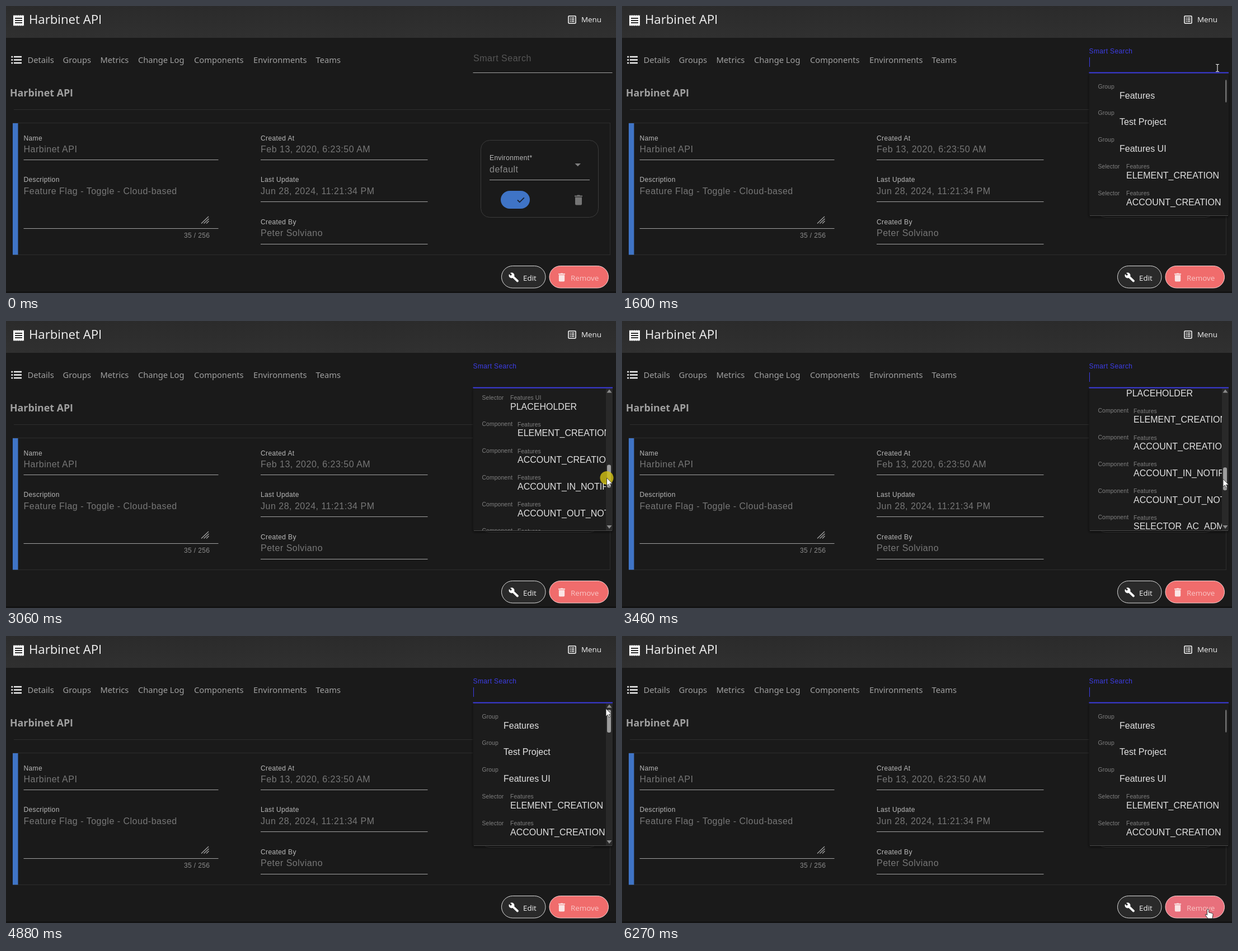
Write an HTML page that moves like this. It is 1090 by 514 pixels and loops after 6650 ms.

```html
<!DOCTYPE html>
<html lang="en">
<head>
<meta charset="utf-8">
<title>Smart search</title>
<style>
  html, body { margin: 0; width: 100%; height: 100%; overflow: hidden; background: #1a1a1a; }
  svg { display: block; width: 100vw; height: 100vh; }
  text { font-family: "Liberation Sans", Arial, sans-serif; white-space: pre; }
  .title, .heading, .button { font-family: "Open Sans", sans-serif; }
  .title { font-size: 22.2px; fill: #f2f2f2; }
  .heading { font-size: 17.8px; font-weight: 700; fill: #a0a0a0; }
  .button { font-size: 13.4px; fill: #f4f4f4; }
  .nav { font-family: "Noto Sans", sans-serif; font-size: 14.7px; fill: #a0a0a0; }
  .label { font-size: 12px; letter-spacing: .38px; fill: #b9b9b9; }
  .value { font-size: 16px; letter-spacing: .5px; fill: #777; }
  .small { font-size: 10.4px; letter-spacing: .1px; fill: #808080; }
  .option { font-size: 16px; fill: #e2e2e2; }
  .rule { stroke: #a2a2a2; fill: none; }
  .faint { stroke: #2d2d2d; fill: none; }
</style>
</head>
<body>
<svg viewBox="0 0 1090 514">
  <defs>
    <clipPath id="listClip"><rect x="834" y="121" width="238" height="254"/></clipPath>
    <linearGradient id="headerFill" x2="0" y2="1">
      <stop offset="0" stop-color="#2b2b2b"/><stop offset="1" stop-color="#303030"/>
    </linearGradient>
    <filter id="shadow" x="-10%" y="-10%" width="120%" height="120%">
      <feDropShadow dx="0" dy="2" stdDeviation="2" flood-color="#000" flood-opacity=".6"/>
    </filter>
    <path id="trash" d="M1 4h12v12q0 2-2 2H3q-2 0-2-2zM0 1h4l1-1h4l1 1h4v2H0z"/>
  </defs>

  <rect width="1090" height="514" fill="#1a1a1a"/>
  <rect y="511" width="1090" height="3" fill="#131313"/>
  <rect width="1090" height="57" fill="url(#headerFill)"/>

  <!-- header -->
  <path fill="#fff" d="M13 16l1.6 1.5 1.6-1.5 1.6 1.5 1.6-1.5 1.6 1.5 1.6-1.5 1.6 1.5 1.6-1.5 1.6 1.5 1.6-1.5 1.6 1.5L32 16v20l-1.4-1.5-1.6 1.5-1.6-1.5-1.6 1.5-1.6-1.5-1.6 1.5-1.6-1.5-1.6 1.5-1.6-1.5-1.6 1.5-1.6-1.5L13 36z"/>
  <path stroke="#2d2d2d" stroke-width="2" d="M16 22h13M16 26h13M16 30h13"/>
  <text class="title" x="41" y="32">Harbinet API</text>
  <rect x="1005" y="18" width="13" height="13" rx="1" fill="none" stroke="#fff" stroke-width="1.5"/>
  <path stroke="#fff" stroke-width="1.4" d="M1007.5 21.5h2m1 0h5M1007.5 24.5h2m1 0h5M1007.5 27.5h2m1 0h5"/>
  <text class="button" x="1028" y="29.3" font-weight="500">Menu</text>

  <!-- navigation -->
  <path stroke="#f0f0f0" stroke-width="2.4" d="M14 91h14M14 96.5h14M14 102h14"/>
  <path stroke="#f0f0f0" stroke-width="3.2" stroke-linecap="round" d="M10.8 91h.01M10.8 96.5h.01M10.8 102h.01"/>
  <g id="nav"></g>
  <text class="heading" x="7" y="162">Harbinet API</text>
  <path class="faint" d="M14 185.5H1080"/>

  <!-- details card -->
  <rect class="faint" x="12.5" y="209.5" width="1067" height="236"/>
  <rect x="12" y="210" width="9.5" height="235.5" fill="#3f74c6"/>
  <g id="fields"></g>
  <path class="rule" d="M31.5 275.5H379.5M31.5 398.5H379.5M455 275.5H753.5M455 350.5H753.5M455 426.5H753.5"/>
  <path stroke="#a0a0a0" stroke-width="1.3" d="M349 389.5l13-12.5M353.5 389.5l9-8.5M358 389.5l4.5-4.5"/>
  <text class="label" x="364.4" y="414.5" text-anchor="end" style="fill:#8c8c8c">35 / 256</text>

  <!-- environment -->
  <rect x="848.5" y="240.5" width="210" height="138" rx="16" fill="#1a1a1a" stroke="#3b3b3b"/>
  <text class="label" x="864" y="276">Environment*</text>
  <text class="value" x="864" y="297.5" style="fill:#8a8a8a">default</text>
  <path class="rule" d="M864 311.5H1043"/>
  <path fill="#808080" d="M1016.5 282h10.5l-5.25 5.25z"/>
  <rect x="884" y="331" width="52" height="32" rx="16" fill="#3f74c6"/>
  <path fill="none" stroke="#17202e" stroke-width="1.8" d="M914 347.5l3.8 3.8 8-8"/>
  <use href="#trash" x="1016" y="338.5" fill="#757575"/>

  <!-- actions -->
  <rect x="885.5" y="465.5" width="78.5" height="39.5" rx="19.75" fill="#2a2a2a" stroke="#dedede"/>
  <g transform="translate(898 477)">
    <path stroke="#fff" stroke-width="3.8" stroke-linecap="round" d="M6 6l10 9.5"/>
    <circle cx="5.5" cy="5.5" r="5" fill="#fff"/>
    <path stroke="#2a2a2a" stroke-width="3" d="M0 0l5 5"/>
  </g>
  <text class="button" x="924" y="491.5">Edit</text>
  <rect id="remove" x="971" y="465.5" width="105.5" height="39.5" rx="19.75" stroke="#f6d4d4"/>
  <use href="#trash" transform="translate(987 478.5) scale(.86 .83)" fill="#fae5e5"/>
  <text class="button" x="1009" y="491.5" style="fill:#f8c6c6">Remove</text>

  <!-- search -->
  <g id="idle">
    <text class="value" x="835" y="98.5" style="fill:#565656">Smart Search</text>
    <path class="rule" d="M834.5 119.5H1083.5"/>
  </g>
  <g id="active">
    <rect x="834.5" y="120" width="249.5" height="256" rx="3" fill="#1b1b1b" filter="url(#shadow)"/>
    <path stroke="#4a4a4a" d="M836 375.5H1083"/>
    <g clip-path="url(#listClip)"><g id="options"></g></g>
    <g id="wideBar">
      <rect x="1072" y="121" width="12" height="254" fill="#292929"/>
      <path fill="#8a8a8a" d="M1073.5 128.5h9l-4.5-6zM1073.5 366h9l-4.5 6z"/>
    </g>
    <rect id="thumb" height="41" rx="3"/>
    <text class="label" x="834.5" y="84.5" style="fill:#3d3de8">Smart Search</text>
    <path stroke="#3d3de0" stroke-width="2" d="M834.5 119.5H1084"/>
    <path id="caret" stroke="#3d3de8" d="M835.5 92V109"/>
  </g>

  <!-- pointer -->
  <g id="pointer">
    <circle id="press" r="12" fill="#d0be14" fill-opacity=".82"/>
    <path id="arrow" fill="#fff" stroke="#222" stroke-width=".8" d="M0 0V14l3.2-3 2.2 5 2.2-1-2.2-4.8H10z"/>
    <path id="beam" fill="none" stroke="#e6e6e6" stroke-width="1.2" d="M-3-6.5h2l1 1 1-1h2M0-5.5v11M-3 6.5h2l1-1 1 1h2"/>
    <path id="hand" fill="#fff" stroke="#222" stroke-width=".9" d="M-1.5 1q1.5-2 3 0v5l6 1.5q2 .8 1.5 3L8 17H0l-4.5-6q-.5-2 1.5-1.5l1.5 1.5z"/>
  </g>
</svg>

<script>
const LOOP = 6650;
const $ = id => document.getElementById(id);
const show = (id, on) => { $(id).style.display = on ? '' : 'none'; };

function addText(parent, cls, x, y, content) {
  const el = document.createElementNS('http://www.w3.org/2000/svg', 'text');
  el.setAttribute('class', cls);
  el.setAttribute('x', x);
  el.setAttribute('y', y);
  el.textContent = content;
  $(parent).append(el);
}

Object.entries({
  Details: 38.5, Groups: 101.5, Metrics: 168.5, 'Change Log': 236,
  Components: 336, Environments: 442, Teams: 553.5
}).forEach(([name, x]) => addText('nav', 'nav', x, 102, name));

[
  [31.5, 240.5, 'Name', 'Harbinet API'],
  [31.5, 315, 'Description', 'Feature Flag - Toggle - Cloud-based'],
  [455, 240.5, 'Created At', 'Feb 13, 2020, 6:23:50 AM'],
  [455, 315, 'Last Update', 'Jun 28, 2024, 11:21:34 PM'],
  [455, 390.5, 'Created By', 'Peter Solviano']
].forEach(([x, y, label, value]) => {
  addText('fields', 'label', x, y, label);
  addText('fields', 'value', x, y + 21.5, value);
});

// Search results: groups, then every flag once as a selector and once as a component.
const flags = ['ELEMENT_CREATION', 'ACCOUNT_CREATION', 'ACCOUNT_IN_NOTIFY', 'ACCOUNT_OUT_NOTIFY',
  'SELECTOR_AC_ADM', 'SELECTOR_AC_METRICS', 'ELEMENT_HISTORY', 'TEAM_INVITE', 'HTTPS_AGENT'];
const rows = [
  ...['Features', 'Test Project', 'Features UI'].map(name => ['Group', '', name, 889]),
  ...flags.map(name => ['Selector', 'Features', name, 901]),
  ['Selector', 'Test Project', 'FEATURE', 901],
  ['Selector', 'Features UI', 'PLACEHOLDER', 901],
  ...flags.map(name => ['Component', 'Features', name, 914])
];
rows.forEach(([kind, owner, name, x], i) => {
  const y = 165.5 + 47.75 * i;
  addText('options', 'small', 850.5, y - 18, kind);
  addText('options', 'small', x, y - 17.5, owner);
  addText('options', 'option', x, y, name);
});

// Moments at which the picture is refreshed, on a 10 ms clock: [first, last, count]
const ticks = [[0, 0, 1], [680, 1070, 4], [1210, 1600, 4], [1740, 2260, 5], [2400, 2790, 4],
  [2930, 3460, 5], [3870, 4130, 3], [4270, 4420, 2], [4580, 5190, 5], [5660, 6270, 5]]
  .flatMap(([first, last, count]) => Array.from({ length: count }, (_, i) =>
    Math.floor((first + (last - first) * i / Math.max(1, count - 1)) / 10) * 10));

const path = [[680, 790, 430], [1210, 960, 108], [1470, 1040, 109], [1600, 1064, 111], [1740, 1068, 117],
  [2260, 1079, 153], [2400, 1080, 162], [2530, 1079.5, 177], [3060, 1073.5, 281], [3190, 1074, 286],
  [3460, 1074, 283], [3870, 1075, 270], [4130, 1075, 251], [4880, 1072, 130], [5190, 1054, 200],
  [5660, 1052, 215], [6270, 1047, 489]];
const thumbPath = [[2260, 0], [2400, 9], [2530, 23.3], [3060, 125.55], [3190, 130.5],
  [3870, 130], [4130, 111.15], [4780, 0]];

const presses = [[1340, 1470], [2260, 3460], [3870, 4880]];
const caretOn = [[1340, 1870], [2400, 2930], [3460, 3870], [4420, 5030], [5660, 5960], [6110, LOOP]];
const during = (spans, t) => spans.some(([a, b]) => t >= a && t < b);

function sample(keys, t) {
  const next = keys.findIndex(key => key[0] > t);
  if (next === 0) return keys[0].slice(1);
  if (next < 0) return keys.at(-1).slice(1);
  const a = keys[next - 1], b = keys[next];
  const k = (t - a[0]) / (b[0] - a[0]);
  return a.slice(1).map((v, i) => v + (b[i + 1] - v) * k);
}

function cursorKind(x, y, open) {
  if (x > 834 && y > 86 && y < 121 && x < 1071) return 'beam';
  const overList = open && x > 834 && x < 1071 && y > 121 && y < 376;
  const overButton = x > 885 && x < 1077 && y > 465 && y < 505;
  return overList || overButton ? 'hand' : 'arrow';
}

function render(t) {
  const [x, y] = sample(path, t);
  const [offset] = sample(thumbPath, t);
  const open = t >= 1340;
  const wide = t >= 1870 && t < 5190;
  const kind = cursorKind(x, y, open);

  show('idle', !open);
  show('active', open);
  show('caret', during(caretOn, t));
  show('wideBar', wide);
  $('options').setAttribute('transform', `translate(0 ${-offset * 5})`);
  $('thumb').setAttribute('x', wide ? 1074 : 1078);
  $('thumb').setAttribute('y', 132 + offset);
  $('thumb').setAttribute('width', wide ? 7 : 2.5);
  $('thumb').setAttribute('fill', wide ? '#9c9c9c' : '#707070');

  show('pointer', t >= 680);
  $('pointer').setAttribute('transform', `translate(${x} ${y})`);
  ['arrow', 'beam', 'hand'].forEach(id => show(id, id === kind));
  show('press', during(presses, t));
  $('remove').setAttribute('fill', kind === 'hand' && x > 971 && y > 465 ? '#e8707c' : '#f06c6c');
}

let shown = -1;
const start = performance.now();
function frame() {
  const now = (performance.now() - start) % LOOP;
  const tick = ticks.findLast(t => t <= now);
  if (tick !== shown) render(shown = tick);
  requestAnimationFrame(frame);
}
frame();
</script>
</body>
</html>
```
